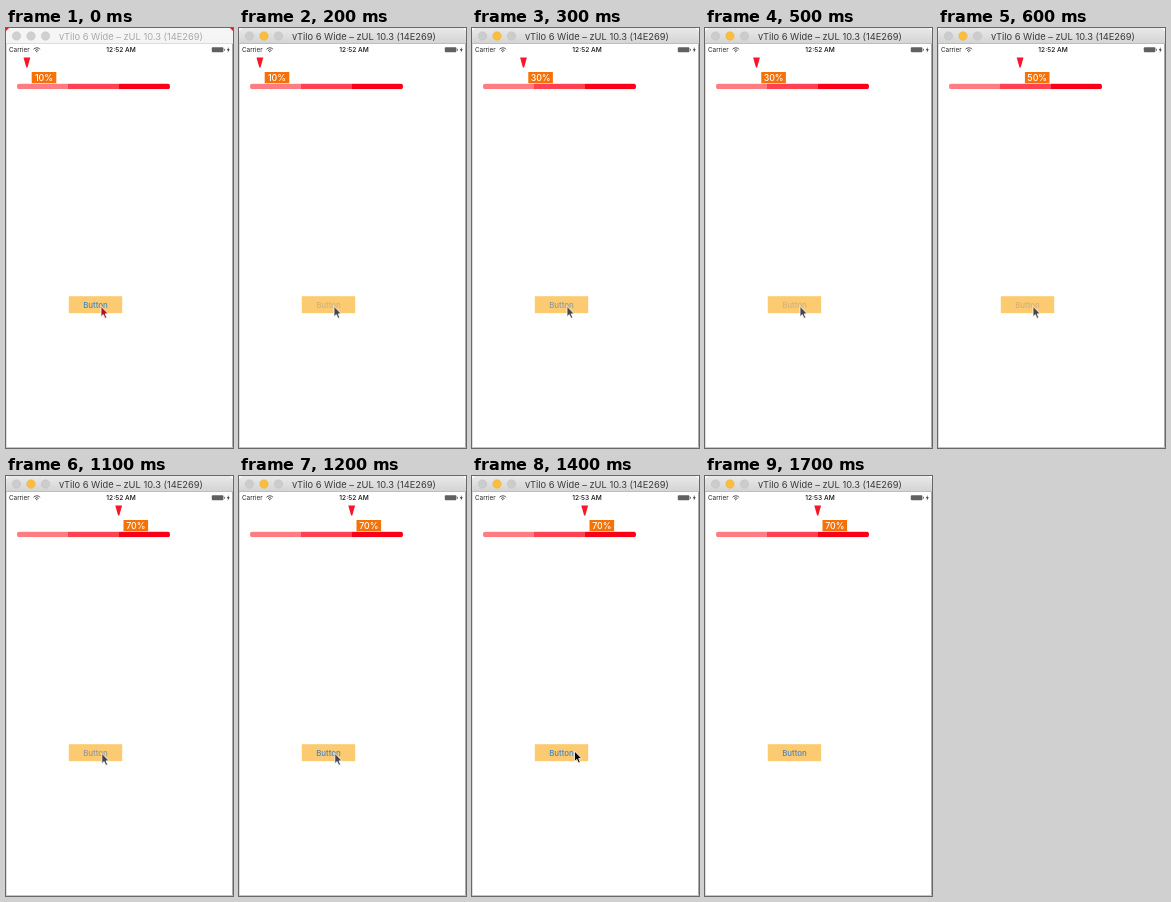
Animation, 227 px wide and 420 px high, one loop 1.8 s. Source, as an HTML page with a canvas:

```html
<!DOCTYPE html>
<html lang="en">
<head>
<meta charset="utf-8">
<title>Progress indicator</title>
<style>
  html, body { margin: 0; width: 100%; height: 100%; overflow: hidden; background: #fff; }
  canvas { display: block; width: 227px; height: 420px; }
</style>
</head>
<body>
<canvas id="stage"></canvas>
<script>
const W = 227, H = 420, LOOP = 1800, STEP = 100;
const canvas = document.getElementById('stage');
const ctx = canvas.getContext('2d');
const ratio = window.devicePixelRatio || 1;
canvas.width = W * ratio;
canvas.height = H * ratio;
ctx.scale(ratio, ratio);

const FONT = 'Inter, Roboto, sans-serif';
const BLUE = '#4586cc', FADING = '#8a9ba3', PRESSED = '#d0b27c';
const BAR = { x: 11, y: 55.6, w: 153, h: 5.7 };

function rect(x, y, w, h, color) {
  ctx.fillStyle = color;
  ctx.fillRect(x, y, w, h);
}

function text(string, x, y, size, color, align = 'left', weight = 400) {
  ctx.font = `${weight} ${size}px ${FONT}`;
  ctx.textAlign = align;
  ctx.textBaseline = 'alphabetic';
  ctx.fillStyle = color;
  ctx.fillText(string, x, y);
}

function polygon(points, color) {
  ctx.beginPath();
  points.forEach(([x, y]) => ctx.lineTo(x, y));
  ctx.closePath();
  ctx.fillStyle = color;
  ctx.fill();
}

function dot(x, y, r, color, edge) {
  ctx.beginPath();
  ctx.arc(x, y, r, 0, Math.PI * 2);
  ctx.fillStyle = color;
  ctx.fill();
  ctx.lineWidth = 0.5;
  ctx.strokeStyle = edge;
  ctx.stroke();
}

function drawTitleBar(active) {
  const fill = ctx.createLinearGradient(0, 0, 0, 16);
  fill.addColorStop(0, active ? '#e9e9e9' : '#f6f6f6');
  fill.addColorStop(1, active ? '#d3d3d3' : '#f4f4f4');
  rect(0, 0, W, 15.5, fill);
  rect(0, 15, W, 0.8, active ? '#b4b4b4' : '#d6d6d6');

  const corner = active ? '#fff' : '#d8201c';
  polygon([[0, 0], [3, 0], [0, 3]], corner);
  polygon([[W, 0], [W - 3, 0], [W, 3]], corner);

  const gray = active ? '#cccccc' : '#d0d0d0';
  dot(10.5, 8, 4.2, gray, '#bebebe');
  dot(25, 8, 4.2, active ? '#fdbe3c' : gray, active ? '#e5ac3c' : '#bebebe');
  dot(39.5, 8, 4.2, gray, '#bebebe');
  text('vTilo 6 Wide – zUL 10.3 (14E269)', 125, 11.5, 9.3,
       active ? '#3a3a3a' : '#a9a9a9', 'center');
}

function drawStatusBar(clock) {
  text('Carrier', 3, 24.2, 6.3, '#222');
  ctx.strokeStyle = '#222';
  ctx.lineWidth = 0.8;
  for (const r of [2.4, 4.4]) {
    ctx.beginPath();
    ctx.arc(30.8, 24.2, r, -Math.PI * 0.77, -Math.PI * 0.23);
    ctx.stroke();
  }
  polygon([[29.9, 23.2], [31.7, 23.2], [30.8, 24.4]], '#222');

  text(clock, 115, 24.2, 6.6, '#111', 'center', 500);

  ctx.beginPath();
  ctx.roundRect(205.8, 19.3, 11.6, 5, 1);
  ctx.fillStyle = '#606060';
  ctx.fill();
  rect(218, 20.8, 0.8, 2, '#606060');
  polygon([[222.8, 19], [220.8, 22.2], [222.2, 22.2], [221.6, 24.8],
           [223.8, 21.3], [222.4, 21.3]], '#333');
}

function drawProgress(percent) {
  const x = 5.6 + percent * BAR.w / 100;
  polygon([[x - 3.4, 29.5], [x + 3.4, 29.5], [x + 0.6, 39.5], [x - 0.6, 39.5]], '#f8142a');
  rect(x + 4.8, 44, 24.6, 11.2, '#f57208');
  text(percent + '%', x + 17.1, 52.9, 8.8, '#fff', 'center', 500);

  ctx.save();
  ctx.beginPath();
  ctx.roundRect(BAR.x, BAR.y, BAR.w, BAR.h, BAR.h / 2);
  ctx.clip();
  ['#ff7d82', '#ff4252', '#fa0018'].forEach((color, i) =>
    rect(BAR.x + i * BAR.w / 3, BAR.y, BAR.w / 3, BAR.h, color));
  ctx.restore();
}

function drawButton(color) {
  rect(62.8, 268.2, 53.4, 17, '#fcca70');
  text('Button', 89.5, 279.8, 7.9, color, 'center', 500);
}

function drawCursor(x, y, color) {
  const arrow = [[0, 0], [0, 10.4], [2.3, 8.3], [4, 12.1], [5.8, 11.3], [4.2, 7.6], [7.2, 7.4]];
  polygon(arrow.map(([dx, dy]) => [x + dx, y + dy]), color);
  ctx.lineJoin = 'round';
  ctx.lineWidth = 0.8;
  ctx.strokeStyle = '#fff';
  ctx.stroke();
}

function percentAt(t) {
  return 10 + 20 * [300, 600, 1100].filter(release => t >= release).length;
}

function labelColorAt(t) {
  if ([100, 200, 500, 600, 1000].includes(t)) return PRESSED;
  if ([300, 700, 1100].includes(t)) return FADING;
  return BLUE;
}

function cursorAt(t) {
  if (t >= 1600) return null;
  if (t >= 1500) return [125, 267];
  if (t >= 1400) return [102.5, 275];
  if (t >= 900) return [95.8, 277.3];
  return [95, 278.3];
}

function draw(now) {
  const t = Math.floor((now % LOOP) / STEP) * STEP;
  const active = t >= 100;
  rect(0, 0, W, H, '#fff');
  drawStatusBar(t >= 1300 ? '12:53 AM' : '12:52 AM');
  drawProgress(percentAt(t));
  drawButton(labelColorAt(t));
  drawTitleBar(active);
  rect(0, 16, 0.5, H - 16, '#bbb');
  rect(W - 1, 16, 1, H - 16, '#aaa');
  rect(0, H - 1, W, 1, '#c4c4c4');

  const cursor = cursorAt(t);
  if (cursor) {
    const color = !active ? '#a8161e' : t >= 1300 ? '#0c0c0c' : '#45454d';
    drawCursor(...cursor, color);
  }
}

const start = performance.now();
function tick() {
  draw(performance.now() - start);
  requestAnimationFrame(tick);
}
draw(0);
requestAnimationFrame(tick);
</script>
</body>
</html>
```
